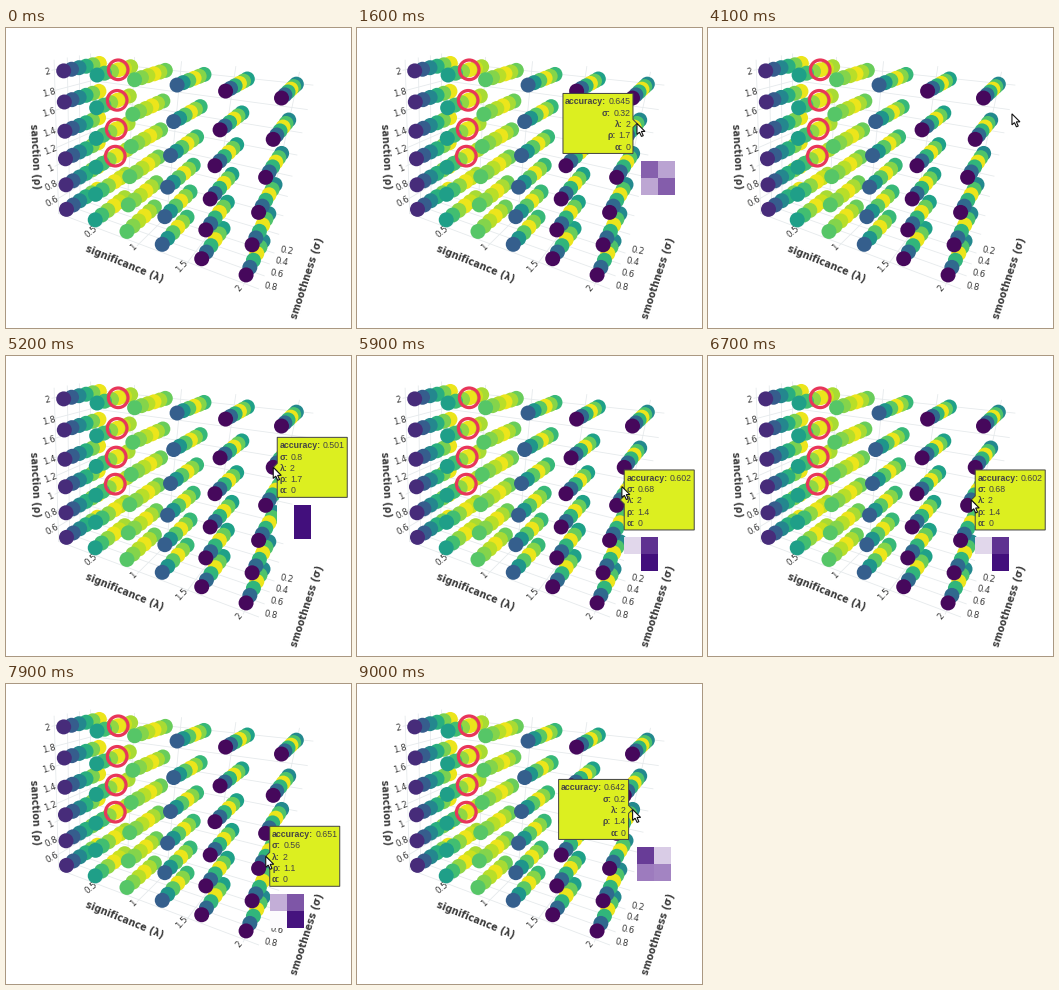
A matplotlib script that plays this animation: 345 px wide and 300 px high, repeating every 9100 ms.

```python
from itertools import product

import numpy as np
import matplotlib.pyplot as plt
from matplotlib.animation import FuncAnimation
from matplotlib.colors import LinearSegmentedColormap
from matplotlib.patches import Circle, Polygon, Rectangle

W, H, DPI = 345, 300, 100
STEP, FRAMES = 100, 91
PT = 72 / DPI
N = 6
LO, HI = -0.3, 5.3

fig = plt.figure(figsize=(W / DPI, H / DPI), dpi=DPI, facecolor="white")
ax = fig.add_axes([0, 0, 1, 1])
ax.set_xlim(0, W)
ax.set_ylim(H, 0)
ax.axis("off")

# Stage places of the cube corners, in product order of (lambda, sigma, rho)
CORNERS = [(92, 160), (93, 36), (60, 182.5), (58, 42.5),
           (257, 214.5), (290, 55.5), (240, 245.5), (276, 70.5)]


def fit_camera():
    rows = []
    for ijk, (x, y) in zip(product((0, 5), repeat=3), CORNERS):
        p = np.array([*ijk, 1.0])
        rows.append(np.r_[p, np.zeros(4), -x * p[:3], x])
        rows.append(np.r_[np.zeros(4), p, -y * p[:3], y])
    eq = np.array(rows)
    sol = np.linalg.lstsq(eq[:, :-1], eq[:, -1], rcond=None)[0]
    return np.r_[sol, 1].reshape(3, 4)


CAMERA = fit_camera()


def project(i, j, k):
    u, v, w = CAMERA @ np.array([i, j, k, 1.0])
    return np.array([u / w, v / w]), w


def label(s, pos, rot, size=8.6, **kw):
    ax.text(*pos, s, rotation=rot, size=size * PT, color="#3c3c3c",
            family="DejaVu Sans", ha="center", va="center", zorder=2, **kw)


def axis_ticks(axis, values, start, step, edge, offset, rot):
    """Grid lines on the two far walls and labels along a near edge."""
    for value in values:
        at = (value - start) / step
        for other in {0, 1, 2} - {axis}:
            a = np.full(3, LO)
            a[axis] = at
            b = a.copy()
            b[other] = HI
            ends = np.array([project(*a)[0], project(*b)[0]])
            ax.plot(*ends.T, color="#e6eaec", lw=0.6, zorder=1)
        spot = np.array(edge)
        spot[axis] = at
        label(f"{value:.2g}", project(*spot)[0] + offset, rot(at))


axis_ticks(0, np.arange(0.5, 2.1, 0.5), 0.1, 0.38, (0, HI, LO), (-4, 2),
           lambda i: 36 + 3 * i)
axis_ticks(1, np.arange(0.2, 0.9, 0.2), 0.2, 0.12, (HI, 0, LO), (12, -2),
           lambda j: -11)
axis_ticks(2, np.arange(0.6, 2.1, 0.2), 0.5, 0.3, (LO, HI, 0), (-4, 2),
           lambda k: 30 - 3.6 * k)
label("sanction (ρ)", (28.5, 128), -87, 9.7, weight="bold")
label("significance (λ)", (119, 236), -22, 9.7, weight="bold")
label("smoothness (σ)", (301, 250), 72, 9.7, weight="bold")


def shade(i, j):
    """Accuracy peaks along sigma and falls off linearly on both sides."""
    peak = min(2 * i, 2)
    near = min(0.1 + 0.44 * abs(i - 1.7), 0.95)
    far = 0.1 * i
    if j >= peak:
        return 0.97 - near * (j - peak) / (5 - peak)
    return 0.97 - far * (peak - j) / peak


balls = [(*project(i, j, k), shade(i, j))
         for i, j, k in product(range(N), repeat=3)]
balls.sort(key=lambda b: -b[1])
places, _, shades = zip(*balls)
ax.scatter(*np.array(places).T, s=(15 * PT) ** 2, c=shades, cmap="viridis",
           vmin=0, vmax=1, linewidths=0, zorder=3)

for k in range(2, N):
    ax.add_patch(Circle(project(1, 2, k)[0], 9.8, fc="none", ec="#e8365a",
                        lw=3.2 * PT, zorder=4))

PURPLE = LinearSegmentedColormap.from_list(
    "purple", ["#ffffff", "#a07fc0", "#420f7c"])
NAMES = ("accuracy:", "σ:", "λ:", "ρ:", "α:")

# Pointer path in grid space: ms, lambda, sigma, rho
PATH = np.array([
    (300, 6.6, 3, 1.5), (700, 5, 2, 2), (1000, 5, 3, 2), (1900, 5, 0, 5),
    (2700, 5, 5, 5), (3200, 5, 5, 5), (3600, 5, 3, 5), (3900, 5.4, 1, 4.35),
    (4200, 5.4, 1, 4.35), (4500, 5, 1, 4), (5000, 5, 5, 4), (5500, 5, 5, 4),
    (6200, 5, 4, 3), (6900, 5, 4, 3), (7600, 5, 3, 2), (7900, 5, 3, 2),
    (8200, 5, 4, 1), (8700, 5, 0, 3),
])

box = ax.add_patch(Polygon([(0, 0)] * 3, fc="#dcef20", ec="#444444",
                           lw=PT, zorder=10))
cells = [ax.add_patch(Rectangle((0, 0), 17, 17, lw=0, zorder=9))
         for _ in range(4)]


def tip_text(weight):
    return ax.text(0, 0, "", size=8.8 * PT, family="Liberation Sans",
                   weight=weight, color="#444444", va="baseline", zorder=11)


lines = [(tip_text("bold"), tip_text("normal")) for _ in NAMES]
ARROW = np.array([(0, 0), (0, 11), (2.5, 8.8), (4.5, 13), (6.3, 12.2),
                  (4.4, 8), (8, 8)])
pointer = ax.add_patch(Polygon(ARROW, fc="white", ec="#111111", lw=1.1 * PT,
                               joinstyle="miter", zorder=20))
tip_parts = [box, *cells, *(t for pair in lines for t in pair)]


def width(text):
    return text.get_window_extent().width * W / fig.bbox.width


def show_tip(j, k):
    x, y = project(5, j, k)[0]
    side = -1 if x + 75 > W else 1
    near, far = x + 4 * side, x + 74 * side
    box.set_xy([(x, y), (near, y - 4), (near, y - 30), (far, y - 30),
                (far, y + 30), (near, y + 30), (near, y + 4)])

    accuracy = np.interp(j, (0, 3, 4, 5), (0.642, 0.651, 0.602, 0.501))
    values = (f"{accuracy:.3f}", f"{0.2 + 0.12 * j:.3g}", "2",
              f"{0.5 + 0.3 * k:.2g}", "0")
    for n, ((name, value), head, val) in enumerate(zip(lines, NAMES, values)):
        name.set_text(head)
        value.set_text(val)
        gap = width(name) + 2.4
        left = x + 6.3 if side > 0 else x - 6.7 - gap - width(value)
        base = y + 11.3 * (n - 2) + 3.5
        name.set_position((left, base))
        value.set_position((left + gap, base))

    # Confusion matrix whose diagonal averages to the accuracy
    hit = 0.16 * (5 - j)
    miss = max(hit + 1 - 2 * accuracy, 0.0)
    for n, (cell, v) in enumerate(zip(cells, (hit, 1 - hit, miss, 1 - miss))):
        cell.set_xy((x + 4 + 17 * (n % 2), y + 37.5 + 17 * (n // 2)))
        cell.set_facecolor(PURPLE(float(v)))


def draw(frame):
    ms = frame * STEP
    i, j, k = (np.interp(ms, PATH[:, 0], col) for col in PATH[:, 1:].T)
    inside = ms >= PATH[0, 0]
    hover = inside and i < 5.15
    pointer.set_visible(inside)
    pointer.set_xy(ARROW + project(i, j, k)[0])
    for part in tip_parts:
        part.set_visible(hover)
    if hover:
        show_tip(round(j), round(k))
    return [pointer, *tip_parts]


anim = FuncAnimation(fig, draw, frames=FRAMES, interval=STEP, repeat=True,
                     repeat_delay=0, blit=False)
plt.show()
```
